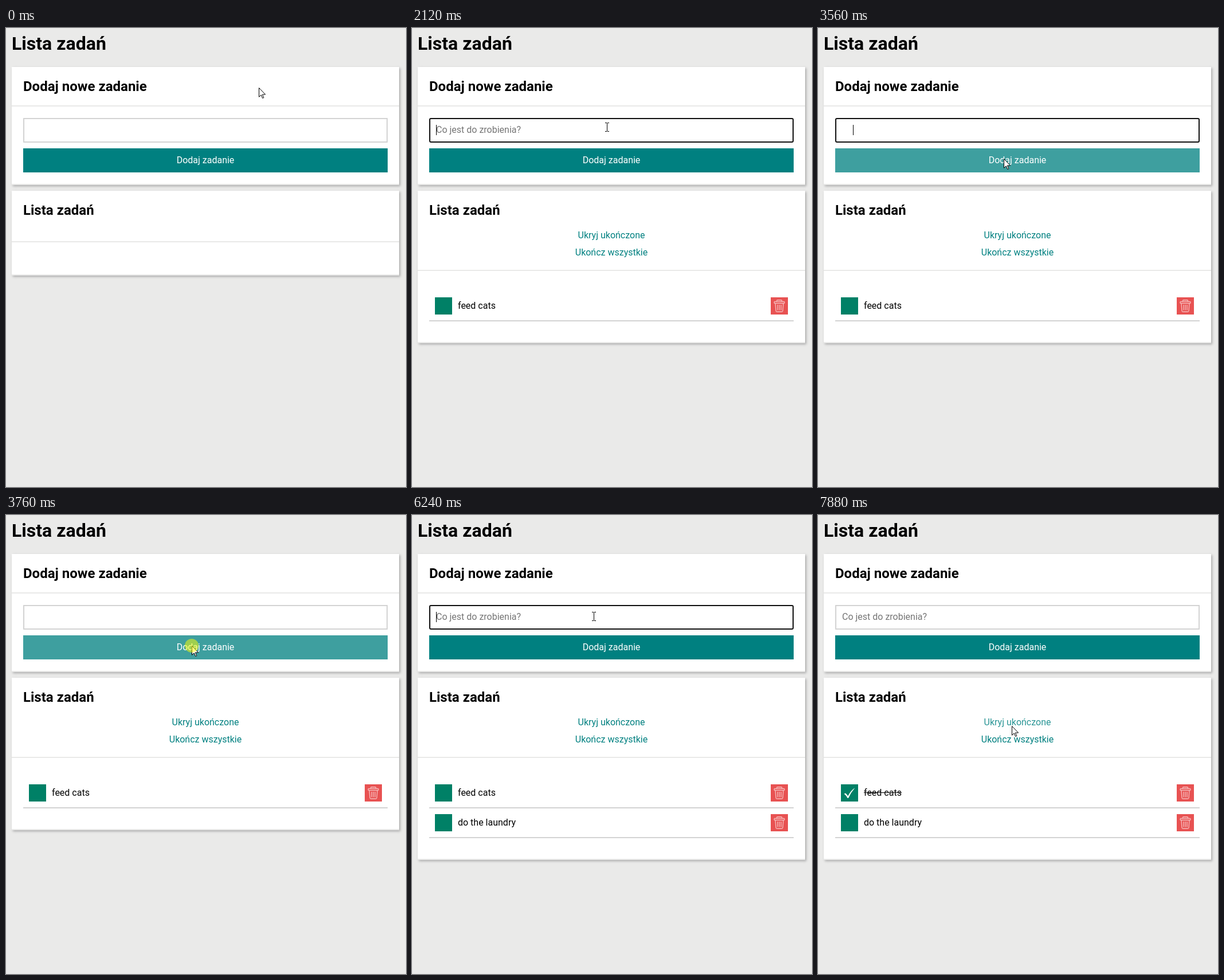
Recreate the animation shown at these times as an HTML page. Size 698x801 px, loop 8 s.

```html
<!DOCTYPE html>
<html lang="pl">
<head>
<meta charset="utf-8">
<title>Lista zadań</title>
<style>
  html, body { margin: 0; width: 100%; height: 100%; overflow: hidden; background: #eaeae9; }
  #stage { position: relative; width: 698px; height: 801px; overflow: hidden; font: 16px/19px Roboto, sans-serif; color: #000; }
  #stage * { box-sizing: border-box; }
  #stage div, #stage svg { position: absolute; white-space: pre; }
  h1, h2 { position: absolute; margin: 0; white-space: pre; font-weight: 700; }
  h1 { left: 10px; top: 8px; font-size: 32px; line-height: 38px; }
  h2 { left: 20px; top: 20px; font-size: 24px; line-height: 28px; }
  #stage .card { left: 10px; width: 676px; background: #fff; border-bottom: 2px solid #e9e9e8; box-shadow: 2px 2px 4px #aaa; }
  .rule { left: 0; width: 676px; height: 2px; background: #e9e9e8; }
  #field { left: 20px; top: 89px; width: 636px; height: 43px; border: 2px solid #d3d3d3; padding: 9px 10px; }
  #field.focus { border-color: #101010; border-radius: 3px; }
  #hint { left: 10px; top: 9px; color: #757575; }
  #caret { position: absolute; top: 10px; width: 1px; height: 18px; margin-left: -.45px; background: #000; }
  #button { left: 20px; top: 142px; width: 636px; height: 42px; padding-top: 11px; color: #fff; text-align: center; }
  .link { left: 0; right: 0; width: fit-content; margin: auto; }
  .task { left: 20px; width: 636px; height: 52px; border-bottom: 2px solid #d3d3d3; }
  .task .box { left: 10px; top: 10px; width: 30px; height: 30px; background: #008066; }
  .task .label { left: 50px; top: 15px; }
  .task svg { top: 10px; fill: none; }
  .task .bin { left: 596px; background: #e85252; stroke: #fff; stroke-opacity: .6; stroke-width: 1.4; }
  .task .check { left: 10px; fill: #fff; }
  .done .label { text-decoration: line-through; }
  .task:not(.done) .check { visibility: hidden; }
  #pointer { left: 0; top: 0; overflow: visible; }
</style>
</head>
<body>
<div id="stage">
  <h1>Lista zadań</h1>
  <div class="card" style="top:68px;height:206px">
    <h2>Dodaj nowe zadanie</h2>
    <div class="rule" style="top:67px"></div>
    <div id="field"><div id="hint">Co jest do zrobienia?</div><span id="typed"></span><span id="caret"></span></div>
    <div id="button">Dodaj zadanie</div>
  </div>
  <div class="card" id="list" style="top:284px">
    <h2>Lista zadań</h2>
    <div class="link" id="hide" style="top:68px">Ukryj ukończone</div>
    <div class="link" id="finish" style="top:98px">Ukończ wszystkie</div>
    <div class="rule" id="listRule"></div>
  </div>
  <svg id="pointer" width="1" height="1">
    <path id="arrow" d="M.5 .5V16.3L4.2 12.8 6.7 18.5 8.8 17.6 6.4 12H11.6Z" fill="#fff" stroke="#000"/>
    <path id="beam" d="M-3 -7.5H0M1 -7.5H4M.5 -7V7M-3 7.5H0M1 7.5H4" fill="none" stroke="#000" shape-rendering="crispEdges"/>
    <circle id="press" r="12" fill="#ff0" fill-opacity=".5"/>
  </svg>
</div>
<script>
const LOOP = 8000, STEP = 40, KEY_GAP = 88, BLINK = 320, PRESS = 160;
const $ = id => document.getElementById(id);
const show = (el, on) => { el.style.visibility = on ? '' : 'hidden'; };

// Bursts of typing at a steady rate; a line break submits the task.
const keys = [
  [0, ' '], [1160, 'feed ca'], [1880, 'ts'], [2120, '\n'],
  [2560, '     '], [4600, 'do the'], [5200, ' '], [5360, 'lau'], [5720, 'ndry'], [6240, '\n']
].flatMap(([at, text]) => [...text].map((char, i) => ({ at: at + i * KEY_GAP, char })));

const home = { x: 441, y: 104 };
const moves = [
  { at: 360, ms: 240, x: 340, y: 173, press: 640 },
  { at: 3080, ms: 240, x: 324, y: 228, press: 3720 },
  { at: 3840, ms: 240, x: 317, y: 177, press: 4080 },
  { at: 6880, ms: 320, x: 50, y: 483, press: 7200 },
  { at: 7400, ms: 480, x: 338, y: 368, press: Infinity }
];

const textAt = t => keys.filter(k => k.at <= t).map(k => k.char).join('');

const rows = textAt(LOOP).split('\n').slice(0, -1).map((name, i) => {
  const row = document.createElement('div');
  row.className = 'task';
  row.style.top = 176 + 52 * i + 'px';
  row.innerHTML = `<div class="box"></div><div class="label">${name.trim()}</div>
    <svg class="check" width="30" height="30"><path d="M5.5 16.5L8 15.5Q10.5 17.5 12.3 20.5Q16.5 11.5 24.5 6Q17.5 14 13 24H11.5Q9.5 19.5 5.5 16.5Z"/></svg>
    <svg class="bin" width="30" height="30"><path d="M10.5 7.5V6Q10.5 4.7 12 4.7H18Q19.5 4.7 19.5 6V7.5
      M7 7.5H23Q24 7.5 24 9T23 10.5H7Q6 10.5 6 9T7 7.5M8 10.5L9 23.5Q9.2 25.3 11 25.3H19Q20.8 25.3 21 23.5L22 10.5
      M12 13V22.5M15 13V22.5M18 13V22.5"/></svg>`;
  $('list').append(row);
  return row;
});

function pointerAt(t) {
  let from = home;
  for (const to of moves) {
    if (t < to.at + to.ms) {
      const k = Math.max(0, (t - to.at) / to.ms), ease = k * k * (3 - 2 * k);
      return { x: Math.round(from.x + (to.x - from.x) * ease), y: Math.round(from.y + (to.y - from.y) * ease) };
    }
    from = to;
  }
  return from;
}

function over(el, { x, y }) {
  const r = el.getBoundingClientRect();
  return x >= r.left && x < r.right && y >= r.top && y < r.bottom;
}

// The hover tint fades over the last three steps of the pointer.
function teal(el, t) {
  const hover = [0, 1, 2].filter(i => over(el, pointerAt(t - i * STEP))).length / 3;
  const light = c => Math.round(c + (255 - c) * .245 * hover);
  return `rgb(${light(0)},${light(128)},${light(128)})`;
}

function render(t) {
  const lines = textAt(t).split('\n');
  const value = lines.pop(), count = lines.length;
  $('typed').textContent = value;
  show($('hint'), !value);

  const pressed = moves.filter(m => m.press <= t).pop();
  const focus = Boolean(pressed) && over($('field'), pressed);
  const lastAct = Math.max(pressed ? pressed.press : 0, ...keys.map(k => k.at).filter(at => at <= t));
  $('field').className = focus ? 'focus' : '';
  show($('caret'), focus && (t - lastAct) % (2 * BLINK) < BLINK);

  $('button').style.background = teal($('button'), t);
  for (const link of [$('hide'), $('finish')]) {
    link.style.color = teal(link, t);
    show(link, count);
  }
  rows.forEach((row, i) => {
    const box = row.querySelector('.box');
    show(row, i < count);
    row.classList.toggle('done', moves.some(m => t >= m.press + PRESS / 2 && over(box, m)));
  });
  $('listRule').style.top = count ? '138px' : '88px';
  $('list').style.height = (count ? 214 + 52 * count : 148) + 'px';

  const tip = pointerAt(t), editing = over($('field'), tip);
  $('pointer').style.transform = `translate(${tip.x}px,${tip.y}px)`;
  show($('arrow'), !editing);
  show($('beam'), editing);
  show($('press'), pressed && t < pressed.press + PRESS);
}

const start = performance.now();
function tick() {
  const t = (performance.now() - start) % LOOP;
  render(Math.floor(t / STEP) * STEP);
  requestAnimationFrame(tick);
}
tick();
</script>
</body>
</html>
```
